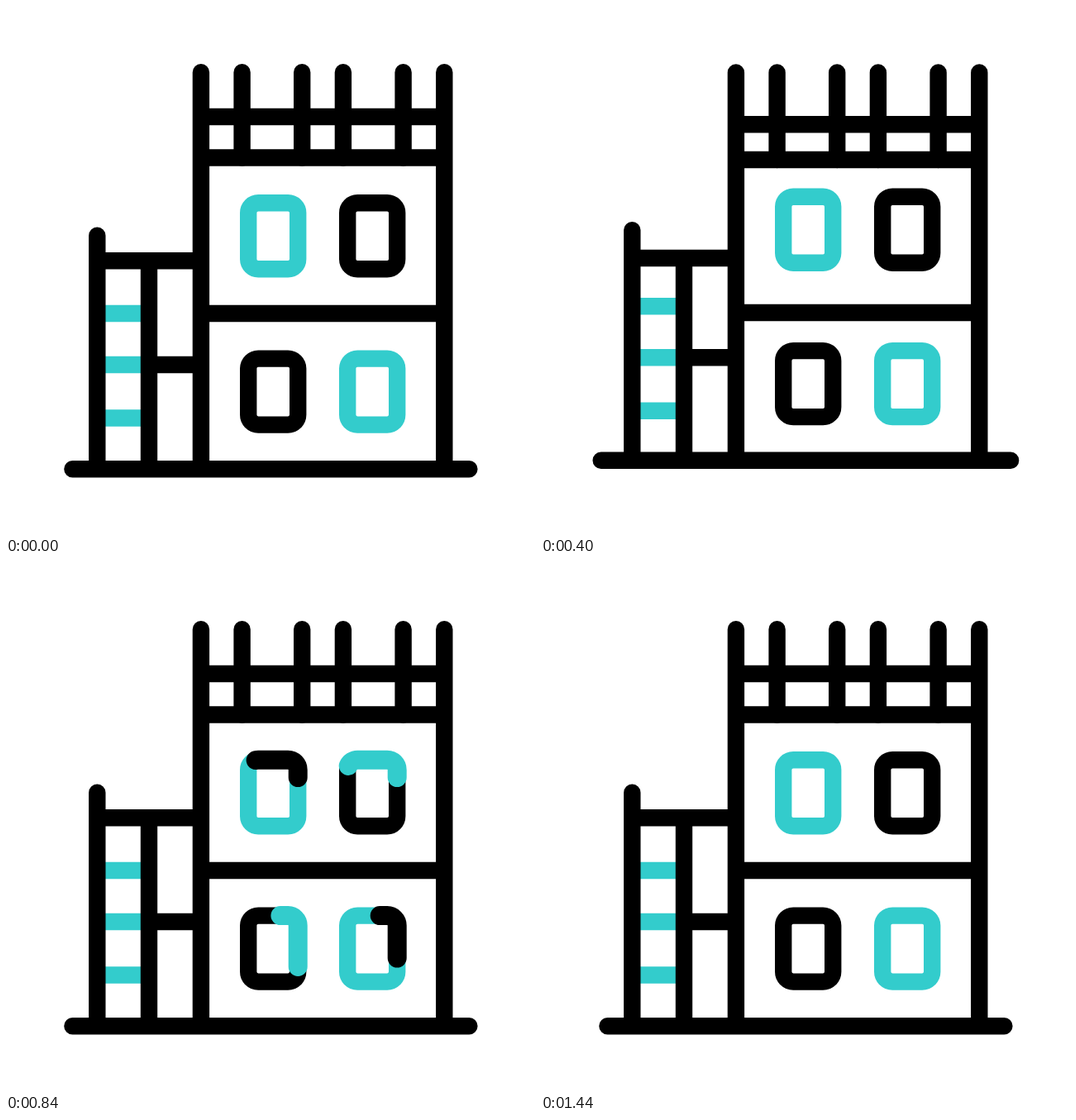
These frames come from a looping animation (640 px wide and 640 px high, 1480 ms). An HTML page:

```html
<!DOCTYPE html>
<html lang="en">
<head>
<meta charset="utf-8">
<title>Hopping building</title>
<style>
  html, body { margin: 0; width: 100%; height: 100%; overflow: hidden; background: #fff; }
  svg { display: block; width: 100vw; height: 100vh; }
  path { fill: none; stroke-width: 20.4; }
  .round { stroke-linecap: round; }
  .sweep { stroke-width: 23; stroke-linecap: round; }
</style>
</head>
<body>
<svg id="stage" viewBox="0 0 640 640"></svg>
<script>
const LOOP = 1480, STEP = 40;
const INK = '#000', TEAL = '#33cccc';
const stage = document.getElementById('stage');

function addPath(color, cls = '') {
  const p = document.createElementNS('http://www.w3.org/2000/svg', 'path');
  p.setAttribute('stroke', color);
  if (cls) p.setAttribute('class', cls);
  return stage.appendChild(p);
}

// Eased progress from time a to time b.
function ease(t, a, b) {
  const u = Math.min(1, Math.max(0, (t - a) / (b - a)));
  return u * u * (3 - 2 * u);
}

// Rest value, shift at the top of the hop, shift at the landing squash.
const PARTS = {
  ground:   [560.3, -30, 0],
  half:     [240, -9.3, 17],
  tops:     [80.3, -53.5, 29.3],
  rail:     [134, -54.8, 44],
  roof:     [183.5, -45, 28.2],
  floor:    [372, -45, 22.8],
  sideTop:  [277.7, -55, 19.7],
  sideBeam: [308.2, -45, 19.5],
  rungs:    [372, -61.7, 19.9],
  upper:    [238.2, -57.3, 19.7],
  lower:    [426.6, -61.3, 18.7]
};

function pose(t) {
  const up = ease(t, 80, 280), down = ease(t, 280, 480), back = ease(t, 480, 680);
  const high = up * (1 - down), low = down * (1 - back);
  const out = {};
  for (const k in PARTS) {
    const [rest, hop, squash] = PARTS[k];
    out[k] = rest + hop * high + squash * low;
  }
  return out;
}

const rungs = addPath(TEAL);
const beams = addPath(INK);
const posts = addPath(INK, 'round');

const W = 60, H = 80, R = 12;
const arc = (x, y, dir) => `a${R} ${R} 0 0 ${dir} ${x} ${y}`;

// Clockwise outline starting on the top edge.
function frameCw(x, y, lead) {
  return `M${x + lead} ${y}H${x + W - R}${arc(R, R, 1)}V${y + H - R}${arc(-R, R, 1)}` +
    `H${x + R}${arc(-R, -R, 1)}V${y + R}${arc(R, -R, 1)}Z`;
}

// Counter-clockwise outline starting on the right edge.
function frameCcw(x, y, lead) {
  return `M${x + W} ${y + lead}V${y + R}${arc(-R, -R, 0)}H${x + R}${arc(-R, R, 0)}` +
    `V${y + H - R}${arc(R, R, 0)}H${x + W - R}${arc(R, -R, 0)}Z`;
}

const QUICK = { head: [680, 1120], tail: [880, 1400] };
const EVEN = { head: [680, 1160], tail: [960, 1440] };

function makeWindow(x, row, color, sweepColor, outline, lead, timing) {
  const base = addPath(color);
  const sweep = addPath(sweepColor, 'sweep');
  sweep.setAttribute('pathLength', 100);
  return { x, row, base, sweep, outline, lead, timing };
}

const windows = [
  makeWindow(293.2, 'upper', TEAL, INK, frameCcw, 21.3, EVEN),
  makeWindow(413.2, 'upper', INK, TEAL, frameCcw, 21.3, QUICK),
  makeWindow(293.2, 'lower', INK, TEAL, frameCw, 38.7, QUICK),
  makeWindow(413.2, 'lower', TEAL, INK, frameCw, 39, EVEN)
];

function drawWindow(w, p, t) {
  const d = w.outline(w.x, p[w.row], w.lead);
  const head = 100 * ease(t, ...w.timing.head);
  const tail = 100 * ease(t, ...w.timing.tail);
  const len = head - tail;
  w.base.setAttribute('d', d);
  w.sweep.setAttribute('d', d);
  w.sweep.setAttribute('visibility', len > 0.01 ? 'visible' : 'hidden');
  w.sweep.setAttribute('stroke-dasharray', `${len} 300`);
  w.sweep.setAttribute('stroke-dashoffset', -tail);
}

const bar = (x1, x2, y) => `M${x1} ${y}H${x2}`;
const post = (x, y1, y2) => `M${x} ${y1}V${y2}`;

function draw(t) {
  const p = pose(t);
  rungs.setAttribute('d', [0, 62, 126.5].map(dy => bar(110, 173, p.rungs + dy)).join(''));
  beams.setAttribute('d',
    [p.rail, p.roof, p.floor].map(y => bar(236, 530, y)).join('') +
    bar(110, 236, p.sideBeam) + bar(173, 236, p.rungs + 62) +
    post(173, p.sideBeam, p.ground));
  posts.setAttribute('d',
    [235.9, 530.3].map(x => post(x, p.tops, p.ground)).join('') +
    [285.6, 358.2, 407.9, 480.6].map(x => post(x, p.tops, p.roof)).join('') +
    post(110.3, p.sideTop, p.ground) +
    bar(320.4 - p.half, 320.4 + p.half, p.ground));
  windows.forEach(w => drawWindow(w, p, t));
}

let start = null;
function tick(now) {
  if (start === null) start = now;
  const t = (now - start) % LOOP;
  draw(Math.floor(t / STEP) * STEP);
  requestAnimationFrame(tick);
}
draw(0);
requestAnimationFrame(tick);
</script>
</body>
</html>
```
